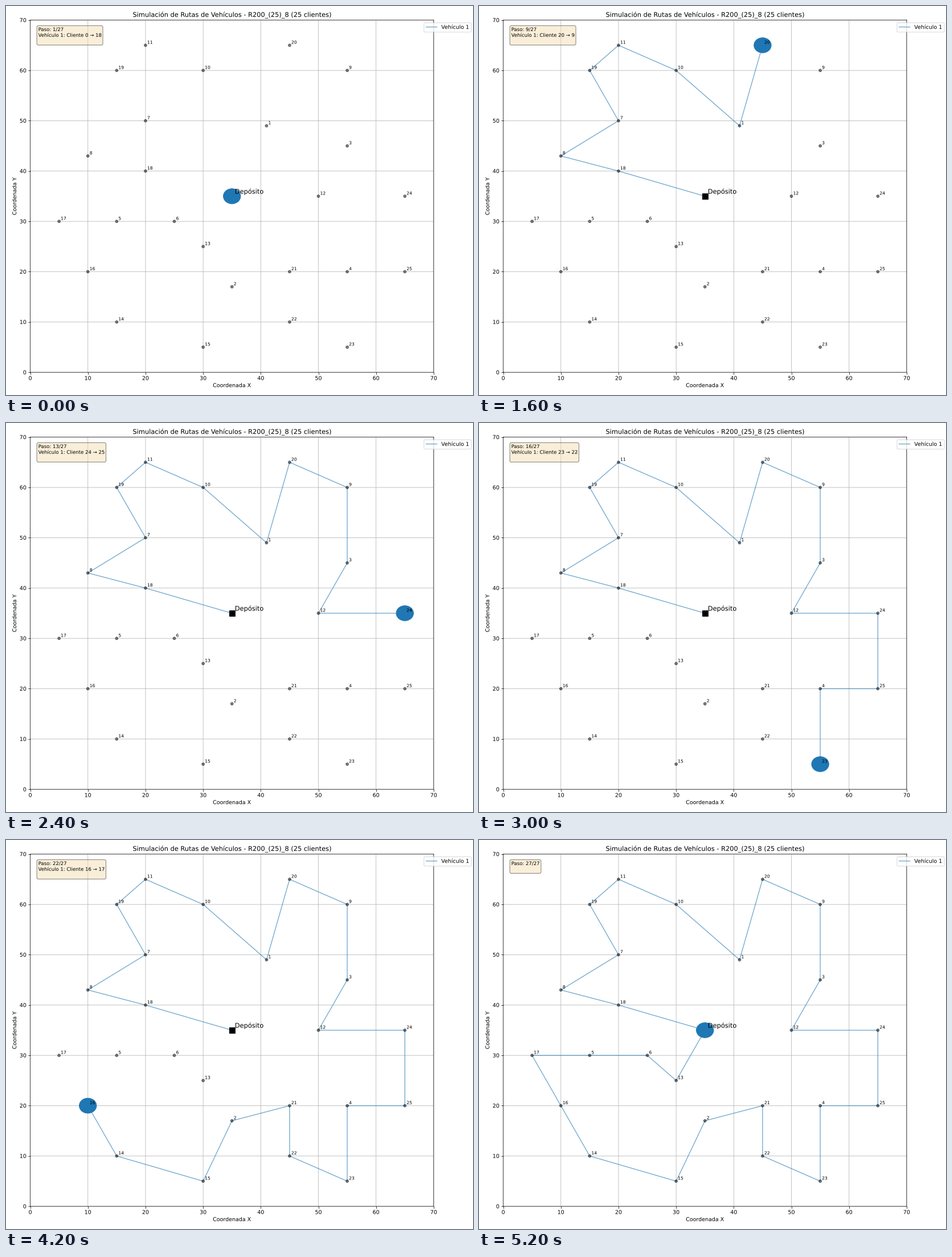
Animation of 820 by 683 pixels, one loop 5.4 s. Source, as a matplotlib script:

```python
import matplotlib.pyplot as plt
from matplotlib.animation import FuncAnimation
from matplotlib.patches import Circle
from matplotlib.patheffects import Normal

W, H = 820, 683
DPI = W / 12
BLUE = "#1f77b4"
DEPOT = (0, 35, 35)

# Customers (id, x, y) in visiting order; the tour starts and ends at the depot.
TOUR = [
    DEPOT,
    (18, 20, 40), (8, 10, 43), (7, 20, 50), (19, 15, 60), (11, 20, 65),
    (10, 30, 60), (1, 41, 49), (20, 45, 65), (9, 55, 60), (3, 55, 45),
    (12, 50, 35), (24, 65, 35), (25, 65, 20), (4, 55, 20), (23, 55, 5),
    (22, 45, 10), (21, 45, 20), (2, 35, 17), (15, 30, 5), (14, 15, 10),
    (16, 10, 20), (17, 5, 30), (5, 15, 30), (6, 25, 30), (13, 30, 25),
    DEPOT,
]
IDS, XS, YS = zip(*TOUR)
STEPS = len(TOUR)

# Drawing text and markers as paths keeps their sub-pixel positions.
plt.rcParams.update({
    "font.family": "DejaVu Sans",
    "text.hinting": "none",
    "path.snap": False,
    "path.effects": [Normal()],
})


def tag(x, y, text, size, gap):
    ax.text(x + gap, y + gap, text, fontsize=size)


fig, ax = plt.subplots(figsize=(12, H / DPI + 1e-4), dpi=DPI)
fig.subplots_adjust(left=0.0519, right=0.9158, bottom=0.0583, top=0.9637)
ax.set(xlim=(0, 70), ylim=(0, 70),
       xlabel="Coordenada X", ylabel="Coordenada Y",
       title="Simulación de Rutas de Vehículos - R200_(25)_8 (25 clientes)")
ax.grid(True)

ax.plot(XS[0], YS[0], "ks", markersize=10, zorder=2.2)
tag(XS[0], YS[0], "Depósito", 12, 0.5)

ax.plot(XS[1:-1], YS[1:-1], "ko", markersize=5, alpha=0.5, zorder=2.1)
for name, x, y in TOUR[1:-1]:
    tag(x, y, str(name), 8, 0.3)

path, = ax.plot([], [], color=BLUE, alpha=0.6, label="Vehículo 1")
truck = ax.add_patch(Circle(DEPOT[1:], 1.5, color=BLUE, zorder=2.5))
info = ax.text(0.02, 0.98, "", transform=ax.transAxes, fontsize=9, va="top",
               bbox=dict(boxstyle="round,pad=0.3", facecolor="wheat", alpha=0.5))
ax.legend(loc="upper right", bbox_to_anchor=(1.1, 1))


def update(step):
    done = step + 1
    path.set_data(XS[:done], YS[:done])
    truck.center = XS[step], YS[step]
    text = f"Paso: {done}/{STEPS}\n"
    if done < STEPS:
        text += f"Vehículo 1: Cliente {IDS[step]} → {IDS[done]}\n"
    info.set_text(text)
    return path, truck, info


anim = FuncAnimation(fig, update, frames=STEPS, interval=200,
                     repeat=True, repeat_delay=0)
plt.show()
```
